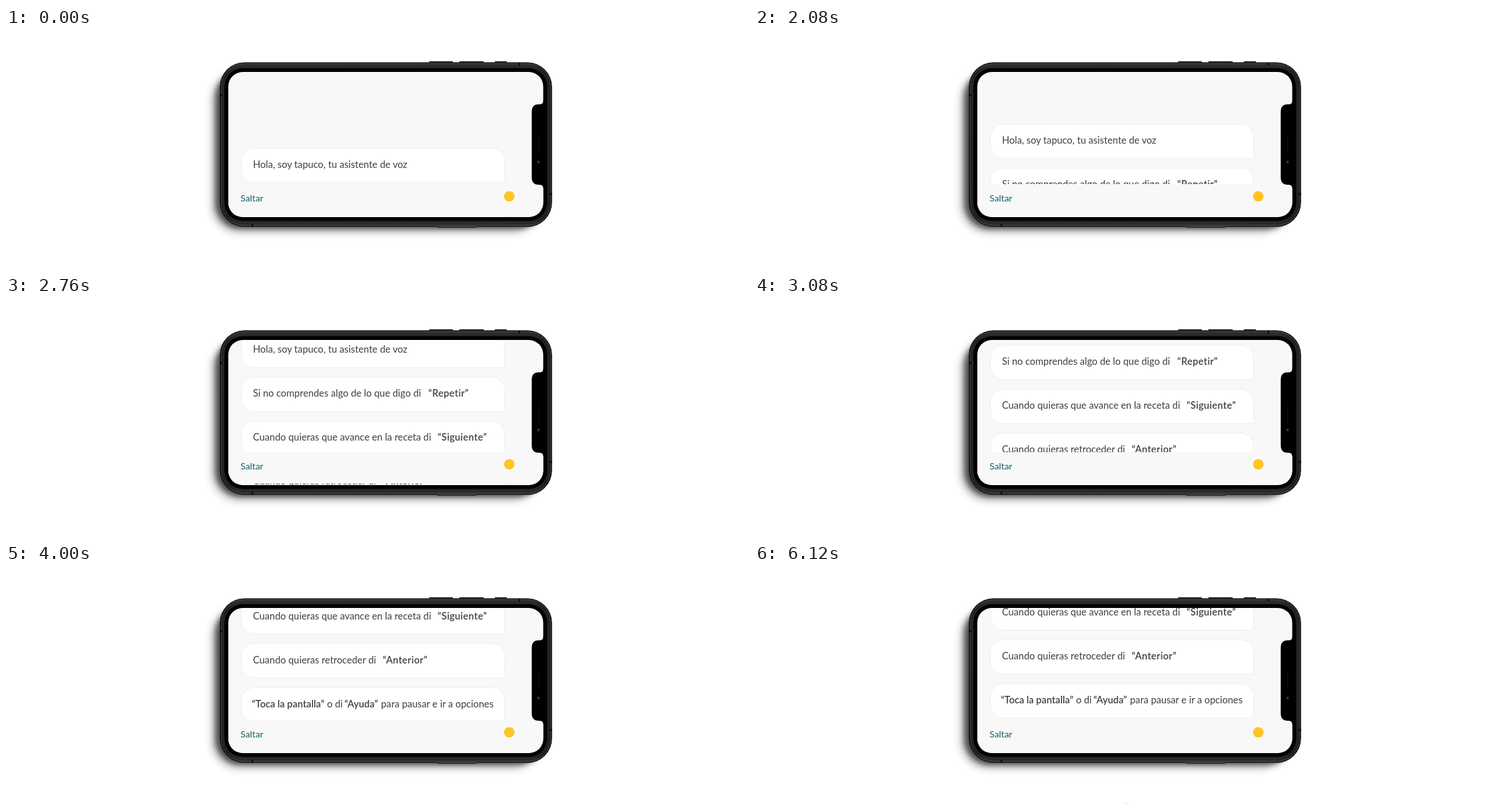
Write an HTML page that moves like this. It is 1280 px wide and 415 px high and loops after 6.6 s.

```html
<!DOCTYPE html>
<html lang="es">
<head>
<meta charset="utf-8">
<title>Asistente de voz</title>
<style>
  html, body { margin: 0; width: 100%; height: 100%; overflow: hidden; background: #fff; }
  svg { display: block; width: 100%; height: 100%; }
  text { font-family: Lato, sans-serif; font-size: 16.7px; fill: #404040; }
  .strong { font-weight: 600; letter-spacing: .4px; }
  .tight .strong { letter-spacing: 0; }
  .skip { font-size: 15.8px; fill: #126464; }
</style>
</head>
<body>
<svg viewBox="0 0 1280 415">
  <defs>
    <clipPath id="screen"><rect x="383" y="76" width="542.5" height="251" rx="25"/></clipPath>
    <filter id="wide" x="-20%" y="-20%" width="140%" height="140%"><feGaussianBlur stdDeviation="8"/></filter>
    <filter id="near" x="-20%" y="-20%" width="140%" height="140%"><feGaussianBlur stdDeviation="4"/></filter>
    <linearGradient id="metal" x2="0" y2="1">
      <stop offset="0" stop-color="#303232"/>
      <stop offset=".06" stop-color="#1b1d1d"/>
      <stop offset=".94" stop-color="#181a1a"/>
      <stop offset="1" stop-color="#303131"/>
    </linearGradient>
  </defs>

  <!-- Shadow -->
  <rect x="357" y="80" width="560" height="271" rx="44" opacity=".4" filter="url(#wide)"/>
  <rect x="361" y="74" width="566" height="273" rx="44" opacity=".5" filter="url(#near)"/>

  <!-- Side buttons -->
  <g fill="#202222">
    <rect x="729" y="57.5" width="41" height="4" rx="1"/>
    <rect x="781" y="57.5" width="42" height="4" rx="1"/>
    <rect x="842" y="57.5" width="21" height="4" rx="1"/>
    <rect x="743" y="341" width="67" height="4.5" rx="1"/>
  </g>

  <!-- Body -->
  <rect x="368.5" y="59.5" width="572" height="284.5" rx="42" fill="url(#metal)"/>
  <g fill="none">
    <rect x="369" y="60" width="571" height="283.5" rx="41.5" stroke="#161818"/>
    <rect x="371.5" y="62" width="566.5" height="279" rx="39" stroke="#464848"/>
    <rect x="374.5" y="66.5" width="560" height="270" rx="35" stroke="#303232"/>
  </g>
  <rect x="376.5" y="69.5" width="555.5" height="264" rx="32"/>
  <g fill="#0c0d0d">
    <rect x="368.5" y="114" width="4" height="4"/>
    <rect x="936.5" y="285" width="4" height="4"/>
    <rect x="883" y="60" width="3" height="5"/>
    <rect x="423" y="338.5" width="3" height="5"/>
  </g>
  <path d="M744 343.5H809" stroke="#555"/>

  <!-- Screen -->
  <g clip-path="url(#screen)">
    <rect x="383" y="76" width="543" height="251" fill="#f8f8f8"/>
    <g id="messages"></g>
    <rect x="383" y="270" width="543" height="54.5" fill="#f8f8f8"/>
    <text class="skip" x="404" y="300">Saltar</text>
    <circle cx="867" cy="291" r="9.1" fill="#ffc425"/>
  </g>

  <!-- Notch -->
  <path d="M928 126H925.5Q925.5 132 919 132H917.5Q905.7 132 905.7 145V258Q905.7 271 917.5 271H919Q925.5 271 925.5 277H928Z"/>
  <rect x="916.5" y="185" width="2.5" height="36" rx="1.2" fill="#080808"/>
  <circle cx="917.5" cy="231.5" r="3" fill="#151515"/>
  <circle cx="917.5" cy="231.5" r="1.6" fill="#444"/>

  <ellipse id="speck" cx="639.7" cy="415" rx="2" ry="1" fill="#bbb"/>
</svg>

<script>
const LOOP = 6600, STEP = 40;
const SCROLL = { start: 1312, duration: 3000, distance: 304.6 };
const PITCH = 76;

// Each message is a list of [x, text, bold] runs.
const messages = [
  [[425.5, 'Hola, soy tapuco, tu asistente de voz']],
  [[425.5, 'Si no comprendes algo de lo que digo di'], [727.5, '“Repetir”', true]],
  [[425.5, 'Cuando quieras que avance en la receta di'], [743.5, '“Siguiente”', true]],
  [[425.5, 'Cuando quieras retroceder di'], [649, '“Anterior”', true]],
  [[423.5, '“Toca la pantalla”', true], [553, 'o di'], [583, '“Ayuda”', true],
   [646, 'para pausar e ir a opciones']],
];

const bubble = 'M427.5 207.5H837A22 22 0 0 1 859 229.5V267H427.5A22 22 0 0 1 405.5 245V229.5A22 22 0 0 1 427.5 207.5Z';
const list = document.getElementById('messages');
const speck = document.getElementById('speck');

list.innerHTML = messages.map((runs, i) => {
  const spans = runs.map(([x, text, bold]) =>
    `<tspan x="${x}"${bold ? ' class="strong"' : ''}>${text}</tspan>`).join('');
  return `<g transform="translate(0 ${i * PITCH})">
    <path d="${bubble}" fill="#fff" stroke="#ececec"/>
    <text y="241.7"${runs.length > 2 ? ' class="tight"' : ''}>${spans}</text></g>`;
}).join('');

// cubic-bezier(.42, 0, .58, 1), solved by bisection
function easeInOut(x) {
  let low = 0, high = 1;
  for (let i = 0; i < 24; i++) {
    const s = (low + high) / 2, r = 1 - s;
    if (1.26 * s * r * r + 1.74 * s * s * r + s ** 3 < x) low = s; else high = s;
  }
  return low * low * (3 - 2 * low);
}

function draw(now) {
  const t = Math.floor((now % LOOP) / STEP) * STEP;
  const progress = Math.min(1, Math.max(0, (t - SCROLL.start) / SCROLL.duration));
  list.setAttribute('transform', `translate(0 ${-SCROLL.distance * easeInOut(progress)})`);
  speck.setAttribute('visibility', t >= 5200 ? 'visible' : 'hidden');
  requestAnimationFrame(draw);
}
draw(performance.now());
</script>
</body>
</html>
```
